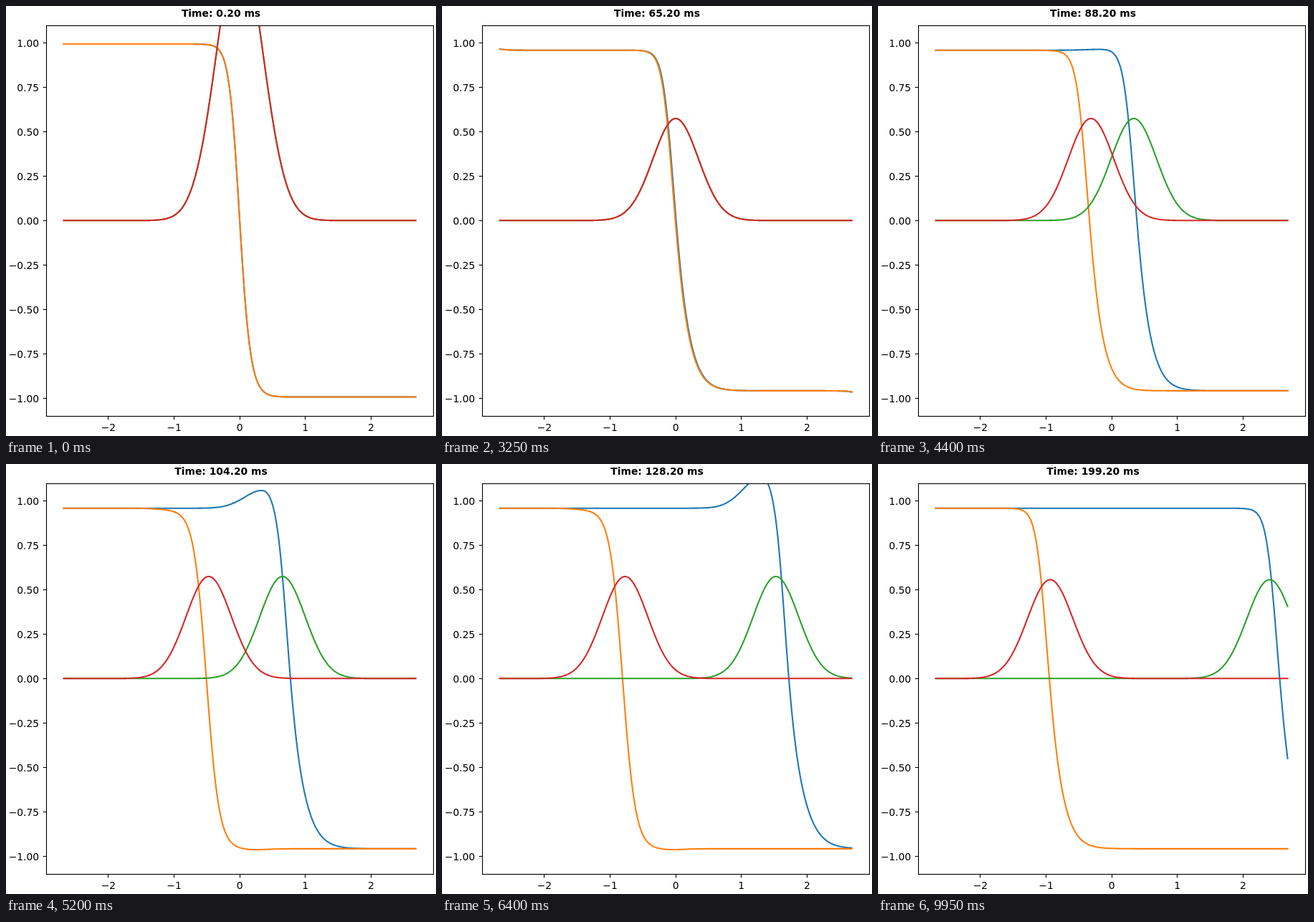
Write an HTML page that moves like this. It is 600 by 600 pixels and loops after 10000 ms.

```html
<!DOCTYPE html>
<html lang="en">
<head>
<meta charset="utf-8">
<title>Travelling fronts</title>
<style>
html, body { margin: 0; width: 100%; height: 100%; overflow: hidden; background: #fff; }
svg { display: block; width: 600px; height: 600px; }
text { font: 13.89px "DejaVu Sans", sans-serif; fill: #000; }
#title { font-weight: bold; text-anchor: middle; }
.axis { fill: none; stroke: #000; stroke-width: 1.11; }
.curve { fill: none; stroke-width: 2.08; stroke-linejoin: round; stroke-linecap: square; }
</style>
</head>
<body>
<svg viewBox="0 0 600 600">
  <clipPath id="plot"><rect x="56.5" y="27.5" width="540" height="545"/></clipPath>
  <g clip-path="url(#plot)">
    <path class="curve" id="blue" stroke="#1f77b4"/>
    <path class="curve" id="orange" stroke="#ff7f0e"/>
    <path class="curve" id="green" stroke="#2ca02c"/>
    <path class="curve" id="red" stroke="#d62728"/>
  </g>
  <g id="axes"><rect class="axis" x="56.5" y="27.5" width="540" height="545"/></g>
  <text id="title" x="300" y="15"></text>
</svg>
<script>
const EDGE = 2.68, LOOP = 10000, STEP = 50, LEAD = 2.4;
const px = x => 326.1 + 91.6 * x;
const py = y => 299.3 - 248 * y;
const $ = id => document.getElementById(id);

// Ramp from 0 to 1 between two times; soft = 0 is linear, 1 is smoothstep
function ease(t, from, to, soft = 1) {
  const u = Math.min(1, Math.max(0, (t - from) / (to - from)));
  return u + soft * (u * u * (3 - 2 * u) - u);
}

// Bump centres: a short push apart, then a long drift
const rightAt = t => .32 * ease(t, 66, 86) + 2.085 * ease(t, 84, 164);
const leftAt = t => -.29 * ease(t, 66, 86) - .647 * ease(t, 84, 147, .5);
const speed = (pos, t) => Math.abs(pos(t + .1) - pos(t - .1)) / .2;

const gauss = (x, sigma) => Math.exp(-x * x / (2 * sigma * sigma));
const bump = (centre, height, sigma) => x => height * gauss(x - centre, sigma);

// rise: overshoot ahead of a forward front; lean: rounding of a backward one
function front(centre, rise, lean, settle, lift) {
  const level = .958 + .035 * settle;
  const width = .215 - .05 * settle - .02 * lean;
  const skew = (.06 + .22 * rise) * (1 - lean) * (1 - .8 * settle);
  const hump = rise - .008 * lean;
  return x => {
    const u = x - centre, h = u + .4;
    return -level * Math.tanh(u / (width + skew * Math.tanh(u / .3)))
      + hump * gauss(h, h < 0 ? .29 : .16)
      - .006 * lean * gauss(u - .7, .22)
      + lift * (Math.exp(-(x + EDGE) / .1) - Math.exp((x - EDGE) / .1));
  };
}

function plot(id, f) {
  const n = 400;
  let d = "";
  for (let i = 0; i <= n; i++) {
    const x = EDGE * (2 * i / n - 1);
    d += (i ? "L" : "M") + px(x).toFixed(2) + " " + py(f(x)).toFixed(2);
  }
  $(id).setAttribute("d", d);
}

function add(tag, attrs, text = "") {
  const el = document.createElementNS("http://www.w3.org/2000/svg", tag);
  for (const k in attrs) el.setAttribute(k, attrs[k]);
  el.textContent = text;
  $("axes").append(el);
}

function drawAxes() {
  const label = (v, digits) => (v < 0 ? "\u2212" : "") + Math.abs(v).toFixed(digits);
  for (let v = -2; v <= 2; v++) {
    const x = Math.floor(px(v)) + .5;
    add("path", { class: "axis", d: `M${x} 572.5v4.86` });
    add("text", { x: px(v), y: 593, "text-anchor": "middle" }, label(v, 0));
  }
  for (let v = -1; v <= 1; v += .25) {
    const y = Math.floor(py(v)) + .5;
    add("path", { class: "axis", d: `M56.5 ${y}h-4.86` });
    add("text", { x: 46.2, y: y + 5, "text-anchor": "end" }, label(v, 2));
  }
}

function render(ms) {
  const age = Math.floor((ms % LOOP) / STEP), t = age + .2;
  const settle = Math.exp(-age / 4);
  const lift = .007 * (1 - settle) * (1 - ease(t, 64, 82));
  const height = .574 + .986 * settle - .018 * ease(t, 128, 164);
  const sigma = .346 + .007 * settle;
  const rise = 120 * speed(rightAt, t) ** 2;
  const lean = Math.min(1, (speed(leftAt, t) / .0117) ** 4);
  plot("blue", front(1.064 * rightAt(t + LEAD), rise, 0, settle, lift));
  plot("orange", front(1.014 * leftAt(t + LEAD), 0, lean, settle, lift));
  plot("green", bump(rightAt(t), height, sigma));
  plot("red", bump(leftAt(t), height, sigma));
  $("title").textContent = `Time: ${t.toFixed(2)} ms`;
}

drawAxes();
const start = performance.now();
function loop() {
  render(performance.now() - start);
  requestAnimationFrame(loop);
}
loop();
</script>
</body>
</html>
```
